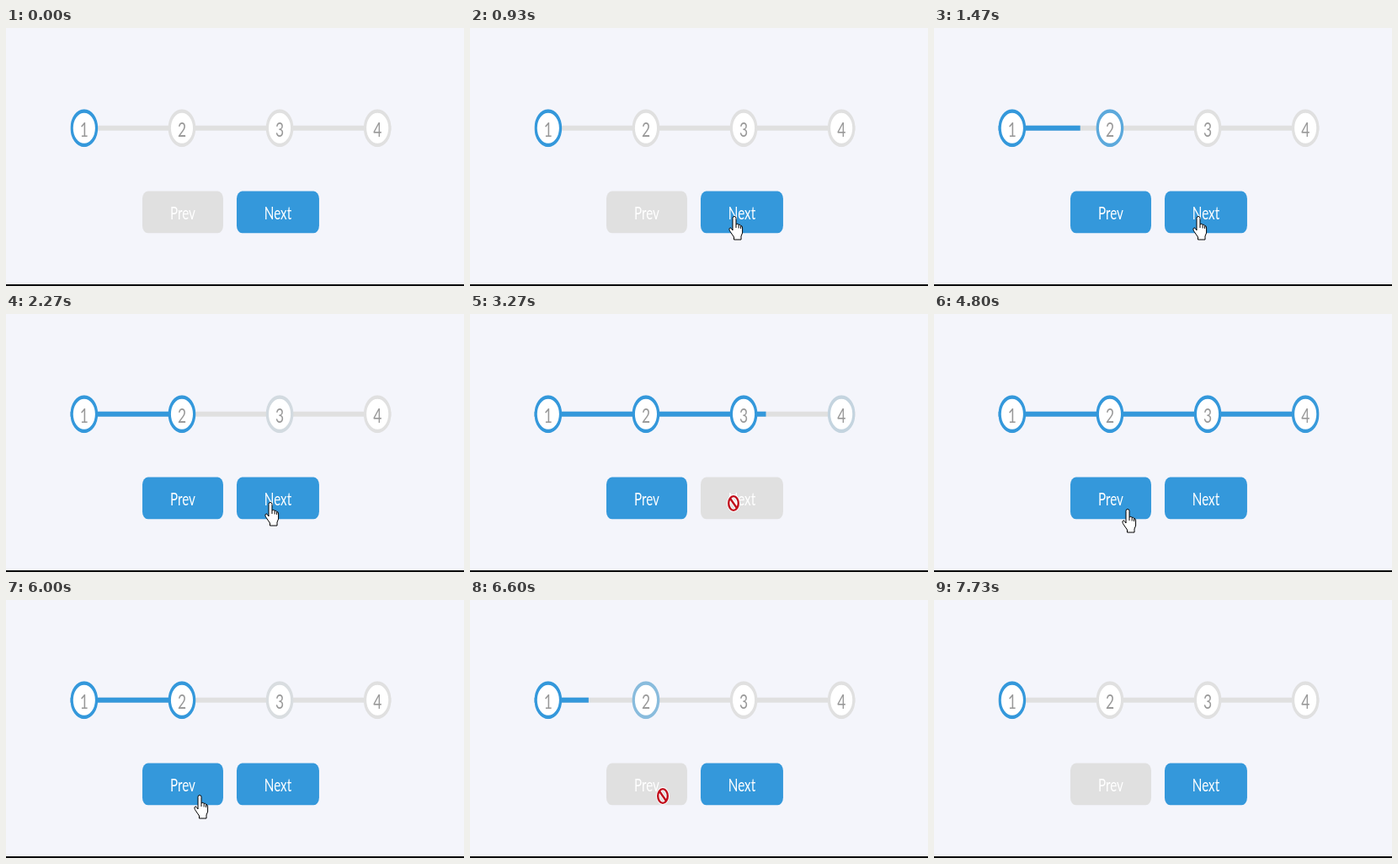
An HTML page that plays this animation: 544x306 px, repeating every 7.79 s.

```html
<!DOCTYPE html>
<html lang="en">
<head>
<meta charset="utf-8">
<title>Progress steps</title>
<style>
  :root { --on: #3498db; --off: #e0e0e0; --loop: 7790ms; }
  html, body { margin: 0; width: 100%; height: 100%; overflow: hidden; background: #f4f5fb; }
  svg { display: block; width: 544px; height: 306px; }
  text { font-family: Lato, "Open Sans", sans-serif; text-anchor: middle; }

  .step circle { fill: #fff; stroke: var(--off); stroke-width: 3; animation: var(--loop) ease infinite; }
  .step text { font-size: 16px; fill: #999; }
  .step .first { stroke: var(--on); }
  .second { animation-name: second !important; }
  .third { animation-name: third !important; }
  .fourth { animation-name: fourth !important; }

  .track { fill: var(--off); }
  .bar { fill: var(--on); animation: bar var(--loop) ease infinite; }

  .btn { transform-box: fill-box; transform-origin: center; animation: var(--loop) step-end infinite; }
  .btn rect { animation: var(--loop) step-end infinite; }
  .btn text { font-size: 14px; fill: #fff; }
  .prev { animation-name: press-prev; }
  .prev rect { animation-name: enable-prev; }
  .next { animation-name: press-next; }
  .next rect { animation-name: enable-next; }

  .pointer { animation: move var(--loop) linear infinite; }
  .pointer g { opacity: 0; animation: var(--loop) step-end infinite; }
  .pointer .arrow { animation-name: arrow; }
  .pointer .hand { animation-name: hand; }
  .pointer .deny { animation-name: deny; }

  /* step borders */
  @keyframes second {
    0%, 16.496%, 88.383%, 100% { stroke: var(--off); }
    21.63%, 83.248% { stroke: var(--on); }
  }
  @keyframes third {
    0%, 28.691%, 78.306%, 100% { stroke: var(--off); }
    33.825%, 73.171% { stroke: var(--on); }
  }
  @keyframes fourth {
    0%, 41.271%, 66.56%, 100% { stroke: var(--off); }
    46.406%, 61.425% { stroke: var(--on); }
  }
  @keyframes bar {
    0%, 16.496%, 88.383%, 100% { transform: scaleX(0); }
    21.63%, 28.691%, 78.306%, 83.248% { transform: scaleX(.3333); }
    33.825%, 41.271%, 66.56%, 73.171% { transform: scaleX(.6667); }
    46.406%, 61.425% { transform: scaleX(1); }
  }

  /* buttons */
  @keyframes enable-prev {
    0%, 83.055%, 100% { fill: var(--off); }
    16.303% { fill: var(--on); }
  }
  @keyframes enable-next {
    0%, 61.232%, 100% { fill: var(--on); }
    41.078% { fill: var(--off); }
  }
  @keyframes press-prev {
    0%, 61.232%, 73.042%, 83.055%, 100% { transform: none; }
    59.949%, 70.218%, 80.488% { transform: scale(.98); }
  }
  @keyframes press-next {
    0%, 16.303%, 28.241%, 41.078%, 100% { transform: none; }
    13.736%, 26.573%, 40.18% { transform: scale(.98); }
  }

  /* pointer */
  @keyframes move {
    0%, 6.033% { transform: translate(338px, 298px); }
    8.601% { transform: translate(322px, 246px); }
    11.938%, 47.497% { transform: translate(313px, 223px); }
    48.78% { transform: translate(303px, 240px); }
    49.679% { transform: translate(284px, 243px); }
    51.348% { transform: translate(254px, 240px); }
    53.915%, 85.366% { transform: translate(229px, 231px); }
    87.291%, 100% { transform: translate(231px, 246px); }
  }
  @keyframes arrow {
    0%, 8.601%, 51.348%, 88.575%, 100% { opacity: 0; }
    6.033%, 48.78%, 87.035% { opacity: 1; }
  }
  @keyframes hand {
    0%, 41.078%, 83.055%, 100% { opacity: 0; }
    8.601%, 51.348% { opacity: 1; }
  }
  @keyframes deny {
    0%, 48.78%, 87.035%, 100% { opacity: 0; }
    41.078%, 83.055% { opacity: 1; }
  }
</style>
</head>
<body>
<svg viewBox="0 0 544 306">
  <!-- the whole widget is seen slightly taller than wide -->
  <g transform="translate(76.5 96.2) scale(1.0886 1.5)">
    <rect class="track" y="13" width="350" height="4"/>
    <rect class="bar" y="13" width="350" height="4"/>

    <g class="step">
      <circle class="first" cx="15" cy="15" r="13.5"/><text x="15" y="21.8">1</text>
      <circle class="second" cx="121.67" cy="15" r="13.5"/><text x="121.67" y="21.8">2</text>
      <circle class="third" cx="228.33" cy="15" r="13.5"/><text x="228.33" y="21.8">3</text>
      <circle class="fourth" cx="335" cy="15" r="13.5"/><text x="335" y="21.8">4</text>
    </g>

    <g class="btn prev">
      <rect x="78.5" y="64.9" width="88.2" height="33.2" rx="6"/>
      <text x="122.6" y="87.1">Prev</text>
    </g>
    <g class="btn next">
      <rect x="181.4" y="64.9" width="90" height="33.2" rx="6"/>
      <text x="226.4" y="87.1">Next</text>
    </g>
  </g>

  <g class="pointer">
    <g class="arrow">
      <path d="M0 0V18L3 14.5L5.2 21.5L7.4 20.2L5.2 13.5H9.5Z" fill="#fff" stroke="#000"/>
    </g>
    <g class="hand" stroke="#000" stroke-linejoin="round">
      <path d="M-1 2.5Q-1 .5 1 .5Q3 .5 3 2.5V10Q5 8.5 6.2 10.3Q8 9.5 8.6 11.7Q10.5 11 10.6 14V20L9 24V28H.5V25L-4.6 17.5Q-6 14.5-4 13.8Q-2.8 14-1 17Z" fill="#fff"/>
      <path d="M3 10V14M6.2 10.3V14.5M8.6 11.7V15" fill="none"/>
    </g>
    <g class="deny" fill="none">
      <path d="M-4.2-4.5L4.2 7.5" stroke="#fff" stroke-width="4"/>
      <ellipse cy="1.5" rx="5.8" ry="8.4" stroke="#fff" stroke-width="4"/>
      <ellipse cy="1.5" rx="5.8" ry="8.4" stroke="#c00d1b" stroke-width="2.4"/>
      <path d="M-4.2-4.5L4.2 7.5" stroke="#c00d1b" stroke-width="2.4"/>
    </g>
  </g>

  <rect y="304" width="544" height="2"/>
</svg>
</body>
</html>
```
